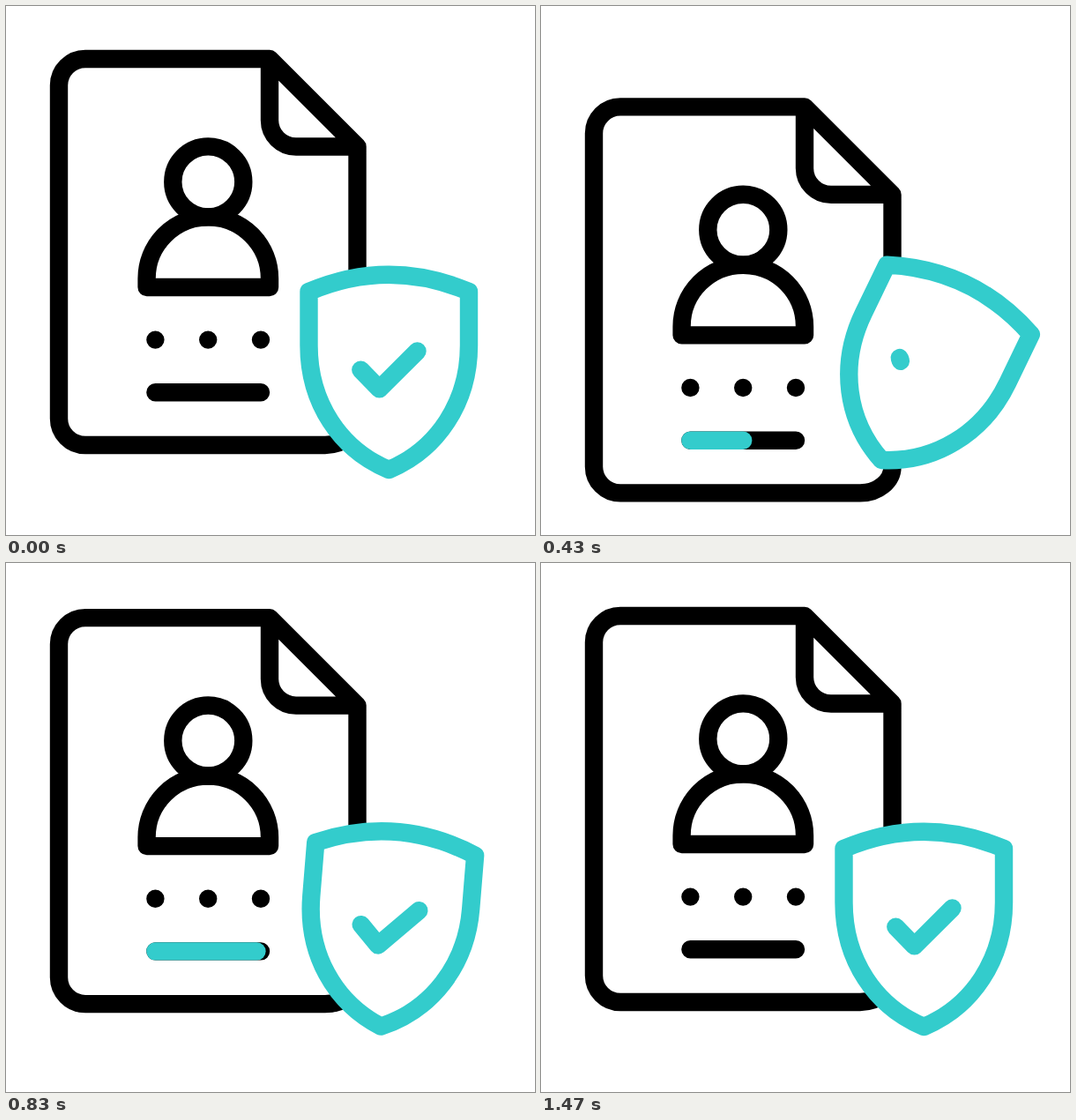
An HTML page for the animation above (1640 ms loop, 600 by 600 pixels).

```html
<!DOCTYPE html>
<html lang="en">
<head>
<meta charset="utf-8">
<title>Verified document</title>
<style>
  html, body { margin: 0; height: 100%; overflow: hidden; background: #fff; }
  svg { display: block; width: 100vw; height: 100vh; }
  path, circle { fill: none; stroke: #000; stroke-width: 20.4; stroke-linecap: round; stroke-linejoin: round; }
  .accent { stroke: #3cc; }
  #shield path:first-child { fill: #fff; }
</style>
</head>
<body>
<svg viewBox="0 0 600 600">
  <g id="page">
    <path d="M299 60H90a30 30 0 0 0-30 30V468a30 30 0 0 0 30 30H362a36.5 30 0 0 0 36.5-30V159.5L299 60V129.5a30 30 0 0 0 30 30H398.5"/>
    <circle cx="229.3" cy="199.4" r="40"/>
    <path d="M159.6 319V309a69.7 69.7 0 0 1 139.4 0V319Z"/>
    <path d="M169.4 378.6h0M229.2 378.6h0M289 378.6h0M169.4 438.3H289"/>
    <path id="bar" class="accent"/>
  </g>
  <g id="shield">
    <path class="accent" d="M343.5 324Q434.3 285.4 525 324V385C525 450 489 503 434.3 526C379 503 343.5 450 343.5 385Z"/>
    <path id="check" class="accent" pathLength="1" d="M402.3 412.7L423.5 434.4L466.5 391.5"/>
  </g>
</svg>
<script>
const LOOP = 1640, LAST = 45;
const [page, bar, shield, check] = ['page', 'bar', 'shield', 'check'].map(id => document.getElementById(id));

// Keys are [step, value] pairs, eased in and out between neighbours.
const pageY = [[0, 0], [11.4, 58], [12, 58], [19.8, -32], [20.4, -32], [30, 41], [38.8, 0]];
const tilt = [[0, 0], [12.5, 26.5], [18.6, -17], [27, 8], [33, -3], [39, 0]];
const drawn = [[0, 1], [15, 0], [25, 1]];

const clamp = x => Math.min(1, Math.max(0, x));
const ease = x => (1 - Math.cos(Math.PI * x)) / 2;

function valueAt(keys, step) {
  const i = keys.findIndex(key => key[0] > step);
  if (i < 0) return keys[keys.length - 1][1];
  const [a, from] = keys[i - 1], [b, to] = keys[i];
  return from + (to - from) * ease((step - a) / (b - a));
}

// 16 steps of 30 ms per 520 ms, the sixth held for 70 ms.
function stepAt(ms) {
  const t = ms % 520;
  const inner = t < 150 ? t / 30 : Math.max(5, (t - 40) / 30);
  return Math.min(LAST, 16 * Math.floor(ms / 520) + Math.floor(inner));
}

function draw(now) {
  const step = stepAt(now % LOOP);
  page.setAttribute('transform', `translate(0 ${valueAt(pageY, step)})`);
  shield.setAttribute('transform', `rotate(${valueAt(tilt, step)} 434.3 415.5)`);

  const length = valueAt(drawn, step);
  check.style.strokeDasharray = length < 1 ? `${length} 2` : 'none';
  check.style.visibility = length > 0 ? 'visible' : 'hidden';

  const start = 169.4 + 119.6 * clamp((step - 25) / 20);
  const end = 169.4 + 119.6 * clamp(step / 26);
  bar.setAttribute('d', end > start ? `M${start} 438.3H${end}` : '');
  requestAnimationFrame(draw);
}
draw(0);
</script>
</body>
</html>
```
